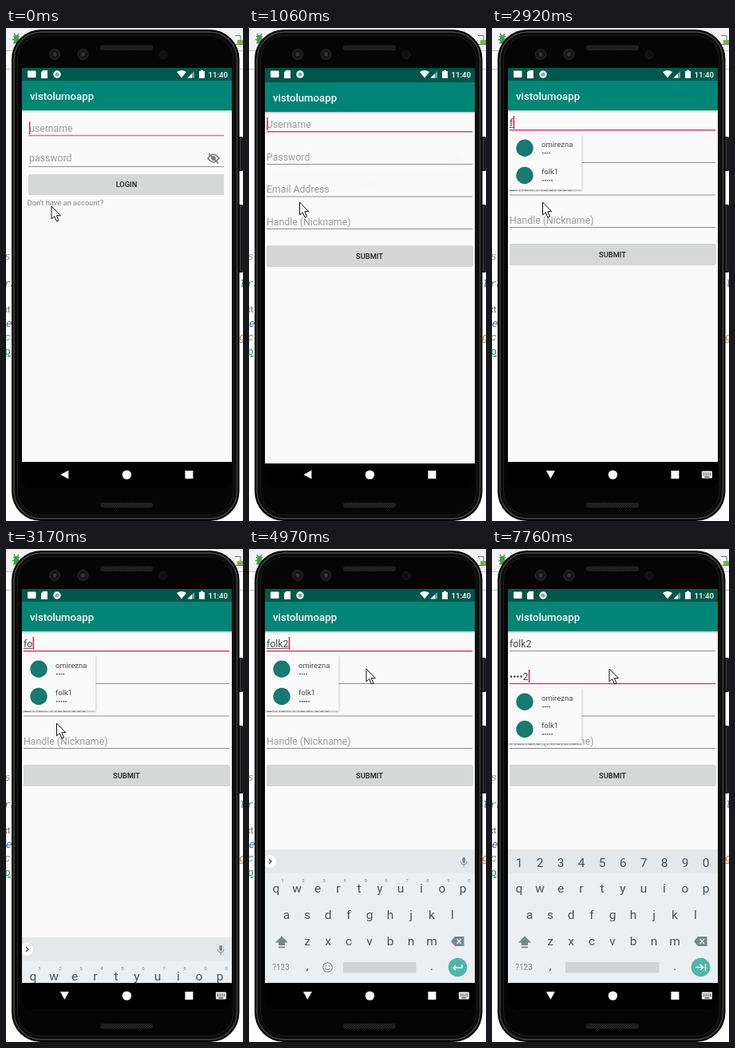
Write an HTML page that moves like this. It is 297 px wide and 617 px high and loops after 8 s.

```html
<!DOCTYPE html>
<html lang="en">
<head>
<meta charset="utf-8">
<title>Sign-up form</title>
<style>
html, body { margin: 0; width: 100%; height: 100%; overflow: hidden; background: #fff; }
svg { display: block; width: 297px; height: 617px; font-family: Roboto, Arial, sans-serif; }
.field { font-size: 12.3px; fill: #484848; }
.hint { font-size: 12.3px; fill: #9b9b9b; }
.line { stroke: #8d8d8d; stroke-width: 1; }
.focus { stroke: #d4436f; stroke-width: 1.4; }
.btn { fill: #d6d7d7; filter: drop-shadow(0 .6px .5px #0005); }
.btnText { font-size: 9.3px; font-weight: 500; fill: #222; text-anchor: middle; }
.title { font-size: 13.2px; font-weight: 500; fill: #fff; }
.small { font-size: 9.5px; fill: #4a4a4a; }
.caret { fill: #d81b60; }
.key { font-size: 15.5px; fill: #46545b; text-anchor: middle; }
.tiny { font-size: 6.2px; fill: #7b868b; text-anchor: middle; }
.code { font: italic 13px "Liberation Mono", monospace; }
</style>
</head>
<body>
<svg viewBox="0 0 297 617">
  <defs>
    <linearGradient id="shade" x2="0" y2="1">
      <stop stop-color="#000" stop-opacity=".22"/><stop offset="1" stop-color="#000" stop-opacity="0"/>
    </linearGradient>
    <pattern id="grill" width="3" height="3" patternUnits="userSpaceOnUse">
      <rect width="3" height="3" fill="#151515"/><path d="M0 3L3 0" stroke="#383838" stroke-width=".9"/>
    </pattern>
    <clipPath id="screen"><path d="M20 50H283V562Q283 576 269 576H34Q20 576 20 562Z"/></clipPath>
    <clipPath id="boardClip"><rect x="20" y="376" width="263" height="167"/></clipPath>
    <g id="bar">
      <rect x="20" y="50" width="263" height="16" fill="#00574b"/>
      <rect x="20" y="66" width="263" height="37" fill="#008577"/>
      <rect x="20" y="103" width="263" height="3" fill="url(#shade)"/>
      <text class="title" x="30" y="89.5">vistolumoapp</text>
    </g>
  </defs>

  <!-- desktop behind the phone -->
  <rect width="297" height="617" fill="#fff"/>
  <rect width="297" height="28" fill="#f2f2f2"/>
  <path d="M0 28.5H297M0 51.5H297" stroke="#c4c4c4"/>
  <path d="M9 10.5H17M8 14.5H18M9 18.5H17M10 7L12 10M16 7L14 10" stroke="#3f9e50" stroke-width="1.4"/>
  <ellipse cx="13" cy="14.5" rx="3.2" ry="5.5" fill="#3f9e50"/>
  <path d="M287 9.5H294V20M287 20.5H297" fill="none" stroke="#777"/>
  <rect x="290" y="15" width="7" height="5" fill="#7cb342"/>
  <g class="code">
    <text x="-2" y="290" fill="#8a9a88">s</text>
    <text x="-2" y="324" fill="#5f8a72">ra</text>
    <text x="-8" y="374" fill="#3f65a0">le</text>
    <text x="-2" y="391" fill="#629755">c</text>
    <text x="-2" y="409" fill="#168a4a" font-style="normal" text-decoration="underline">p</text>
    <text x="292" y="324" fill="#3f65a0">l</text>
    <text x="292" y="391" fill="#b07b3c">g</text>
  </g>
  <text x="-3" y="356" font-size="10" fill="#666">xt</text>

  <!-- phone -->
  <rect x="290" y="136" width="7" height="43" rx="1.5" fill="#1b1b1b"/>
  <rect x="290" y="221" width="7" height="85" rx="1.5" fill="#1b1b1b"/>
  <path d="M293.5 138V177M293.5 223V304" stroke="#444"/>
  <rect x="7" y="2" width="285.5" height="615" rx="37" fill="#000"/>
  <rect x="10" y="5" width="279.5" height="609" rx="34" fill="#0b0b0b" stroke="#484848" stroke-width="1.4"/>
  <rect x="14.5" y="9.5" width="270.5" height="600" rx="30" fill="#050505" stroke="#1e1e1e"/>
  <rect x="118" y="21.5" width="66" height="6.5" rx="3" fill="url(#grill)"/>
  <rect x="118" y="594" width="66" height="6.5" rx="3" fill="url(#grill)"/>
  <g fill="#171717" stroke="#2c2c2c">
    <circle cx="61" cy="33" r="6.5"/><circle cx="96.5" cy="33" r="6.5"/>
    <circle cx="197" cy="33.5" r="5" fill="#101010" stroke="#191919"/>
  </g>
  <g fill="#383838">
    <circle cx="61" cy="33" r="2.3"/><circle cx="96.5" cy="33" r="2.3"/>
  </g>

  <g clip-path="url(#screen)">
    <rect x="20" y="50" width="263" height="526" fill="#000"/>

    <!-- login page -->
    <g id="login">
      <rect x="20" y="60" width="263" height="483" fill="#fafafa"/>
      <use href="#bar"/>
      <text class="hint" x="29" y="129.5">username</text>
      <path class="focus" d="M28 134.5H273" opacity=".72"/>
      <rect class="caret" x="29" y="117" width="1.3" height="16"/>
      <text class="hint" x="29" y="167">password</text>
      <path class="line" d="M28 173.5H273"/>
      <g fill="none" stroke="#777" stroke-width="1.5">
        <path d="M253 163Q259.5 153.5 267 163Q259.5 172.5 253 163Z"/><path d="M254 157L266 169.5"/>
        <circle cx="260" cy="163" r="2" fill="#777"/>
      </g>
      <rect class="btn" x="28.5" y="183" width="244.5" height="26" rx="2"/>
      <text class="btnText" x="151" y="199.3">LOGIN</text>
      <text x="26.5" y="222" font-size="9.35" fill="#858585">Don't have an account?</text>
    </g>

    <!-- navigation -->
    <g fill="#fff" transform="translate(.4 -.4)">
      <path id="back" d="M68 559.5L78 554V565Z"/>
      <circle cx="151" cy="559.5" r="5.7"/>
      <rect x="224" y="554.5" width="10" height="10" rx=".5"/>
      <g id="imeIcon">
        <rect x="262.5" y="555" width="13" height="9" rx="1"/>
        <path d="M264 557.5H274M264 559.8H274" stroke="#000" stroke-width="1.2" stroke-dasharray="1.2 1"/>
        <path d="M266 562.2H272" stroke="#000"/>
      </g>
    </g>

    <!-- register page -->
    <g id="register">
      <rect x="20" y="60" width="263" height="483" fill="#fafafa"/>
      <use href="#bar"/>
      <text id="user" x="22" y="122.7"></text>
      <path id="userLine" d="M22 127.7H280"/>
      <text id="pass" x="22" y="163.7"></text>
      <path id="passLine" d="M22 168.5H280"/>
      <text class="hint" x="22" y="204.2">Email Address</text>
      <path class="line" d="M22 209H280"/>
      <text class="hint" x="22" y="245">Handle (Nickname)</text>
      <path class="line" d="M22 249.5H280"/>
      <path id="under" d="" stroke="#555" stroke-width=".9"/>
      <rect id="caret" class="caret" width="1.5" height="16"/>
      <rect class="btn" x="22" y="270.5" width="258.5" height="26" rx="2"/>
      <text class="btnText" x="151" y="286.5">SUBMIT</text>
      <g id="drop">
        <rect x="20" y="133" width="92.5" height="69.5" fill="#fafafa" style="filter:drop-shadow(0 1px 1.3px #0006)"/>
        <circle cx="41" cy="150.3" r="10.7" fill="#167a70"/>
        <circle cx="41" cy="184.5" r="10.7" fill="#167a70"/>
        <text class="small" x="62" y="149">omirezna</text>
        <text class="small" x="62" y="183.2">folk1</text>
        <path d="M63 156.5H73M63 190.8H76" stroke="#555" stroke-width="1.5" stroke-dasharray="1.7 1.1"/>
      </g>
    </g>

    <!-- status icons -->
    <g fill="#fff">
      <rect x="27" y="53.5" width="10.5" height="8.5" rx="1"/>
      <path d="M46.5 53H52V63H44V55.5Z"/>
      <circle cx="64" cy="58" r="4.7"/><circle cx="64" cy="58" r="2.6" fill="#7fb0a9"/>
      <path d="M214 55Q220 51 226 55L220 62.5Z"/>
      <path d="M227.5 62.5L236 54V62.5Z" opacity=".45"/><path d="M227.5 62.5L233 57V62.5Z"/>
      <path d="M242 54H244V52.7H247V54H249V62.7H242Z"/>
      <text x="253.5" y="62" font-size="9.7" font-weight="500">11:40</text>
    </g>

    <g clip-path="url(#boardClip)"><g id="board">
      <rect x="20" y="376" width="263" height="168" fill="#eceff1"/>
      <rect x="20" y="376" width="263" height="29.5" fill="#e5e8ea"/>
      <g id="keys"></g>
      <path d="M41 484.5L49 492.5H45V496H37V492.5H33Z" fill="#78868d"/><rect x="37" y="497.5" width="8" height="1.8" fill="#78868d"/>
      <path d="M253 491L258 485H269.5V497H258Z" fill="#78868d"/>
      <path d="M260.5 488L266 494M266 488L260.5 494" stroke="#eceff1" stroke-width="1.4"/>
      <text class="key" x="40" y="527" style="font-size:10px;fill:#78868d">?123</text>
      <circle cx="261.5" cy="523.5" r="11.8" fill="#4db6ac"/>
      <g id="textMode">
        <circle cx="26" cy="391" r="8" fill="#fff"/>
        <path d="M25 388L28 391L25 394" fill="none" stroke="#444" stroke-width="1.3"/>
        <rect x="267.3" y="386" width="3.8" height="7" rx="1.9" fill="#78868d"/>
        <path d="M265.3 391Q265.5 395 269.2 395T273.1 391M269.2 395V398" fill="none" stroke="#78868d"/>
        <g fill="none" stroke="#78868d" stroke-width="1.1">
          <circle cx="98.5" cy="523.5" r="5.8"/><path d="M95.5 525Q98.5 528.5 101.5 525M96.5 521V522.5M100.5 521V522.5"/>
        </g>
        <rect x="118" y="517" width="91.5" height="13.5" rx="1" fill="#cfd4d7"/>
        <path d="M267 520V524H256M259 521L256 524L259 527" fill="none" stroke="#fff" stroke-width="1.5"/>
      </g>
      <g id="passMode">
        <rect x="92" y="517" width="117.5" height="13.5" rx="1" fill="#cfd4d7"/>
        <path d="M255 523.5H264.5M261 520L264.5 523.5L261 527M267.5 519V528" fill="none" stroke="#fff" stroke-width="1.5"/>
      </g>
    </g></g>
  </g>

  <path id="mouse" d="M0 0V16L3.7 12.6L6.5 19L9 18L6.3 11.7H11.3Z" fill="#fff" stroke="#111" stroke-width="1"/>
</svg>
<script>
const $ = id => document.getElementById(id);
const show = (el, on) => el.setAttribute("visibility", on ? "inherit" : "hidden");
const LOOP = 8000;

function addText(parent, cls, x, y, str) {
  const el = document.createElementNS("http://www.w3.org/2000/svg", "text");
  el.setAttribute("class", cls);
  el.setAttribute("x", x);
  el.setAttribute("y", y);
  el.textContent = str;
  parent.append(el);
}
function addRow(parent, cls, str, x, y) {
  [...str].forEach((ch, i) => addText(parent, cls, x + i * 26, y, ch));
}
addRow($("keys"), "key", "qwertyuiop", 34, 429.5);
addRow($("keys"), "key", "asdfghjkl", 47, 462.5);
addRow($("keys"), "key", "zxcvbnm", 73, 496);
addRow($("keys"), "key", ",", 73, 527);
addRow($("keys"), "key", ".", 229, 527);
addRow($("textMode"), "tiny", "1234567890", 42, 417);
addRow($("passMode"), "key", "1234567890", 34, 397.5);

// Each track lists [time, value]; a value holds until the next time.
const tracks = {
  mouse: [[0, [57, 223]], [680, [59, 221]], [810, [62, 219]], [1060, [63.5, 218]],
          [4580, [84, 202]], [4740, [118, 172]], [4900, [147, 150]]],
  page: [[0, null], [940, [8, .93]], [1060, [2, .99]], [1180, [0, 1]]],
  user: [[0, ""], [2780, "f"], [3170, "fo"], [3310, "fol"], [3450, "folk"], [3590, "folk2"]],
  pass: [[0, ""], [6520, "f"], [6700, "•o"], [6890, "••l"], [7080, "•••k"], [7760, "••••2"]],
  caret: [[0, 1], [1450, 0], [1850, 1], [2370, 0], [2780, 1], [3990, 0], [4420, 1],
          [5530, 0], [5960, 1], [7610, 0], [7760, 1]],
  drop: [[0, 0], [1450, .5], [1700, 1], [5060, 0], [5530, 1]],
  board: [[0, 168], [3170, 110], [3310, 40], [3450, 0]],
  ime: [[0, 0], [2920, 1]],
  inPass: [[0, 0], [5060, 1]],
  passKeys: [[0, 0], [5220, 1]]
};
const at = (name, t) => tracks[name].findLast(step => step[0] <= t)[1];

function setField(id, value, hint, focused) {
  $(id).textContent = value || hint;
  $(id).setAttribute("class", value ? "field" : "hint");
  $(id + "Line").setAttribute("class", focused ? "focus" : "line");
}

function render(t) {
  const page = at("page", t), user = at("user", t), pass = at("pass", t);
  const inPass = at("inPass", t), ime = at("ime", t), passKeys = at("passKeys", t);

  $("mouse").setAttribute("transform", `translate(${at("mouse", t)})`);
  show($("register"), page);
  $("login").setAttribute("opacity", page ? .85 : 1);
  if (page) {
    $("register").setAttribute("transform", `translate(0 ${page[0]})`);
    $("register").setAttribute("opacity", page[1]);
  }

  setField("user", user, "Username", !inPass);
  setField("pass", pass, "Password", inPass);
  const active = inPass ? pass : user;
  const width = active ? $(inPass ? "pass" : "user").getComputedTextLength() : 0;
  $("caret").setAttribute("x", 22.3 + width);
  $("caret").setAttribute("y", inPass ? 151 : 110);
  show($("caret"), at("caret", t));
  $("under").setAttribute("d", user && !inPass ? `M22 124.5h${width}` : "");

  $("drop").setAttribute("opacity", at("drop", t));
  $("drop").setAttribute("transform", `translate(0 ${inPass ? 41 : 0})`);

  $("board").setAttribute("transform", `translate(0 ${at("board", t)})`);
  show($("textMode"), !passKeys);
  show($("passMode"), passKeys);
  $("back").setAttribute("transform", ime ? "rotate(-90 73 559.5)" : "");
  show($("imeIcon"), ime);
}

const start = performance.now();
function tick() {
  render((performance.now() - start) % LOOP);
  requestAnimationFrame(tick);
}
tick();
</script>
</body>
</html>
```
